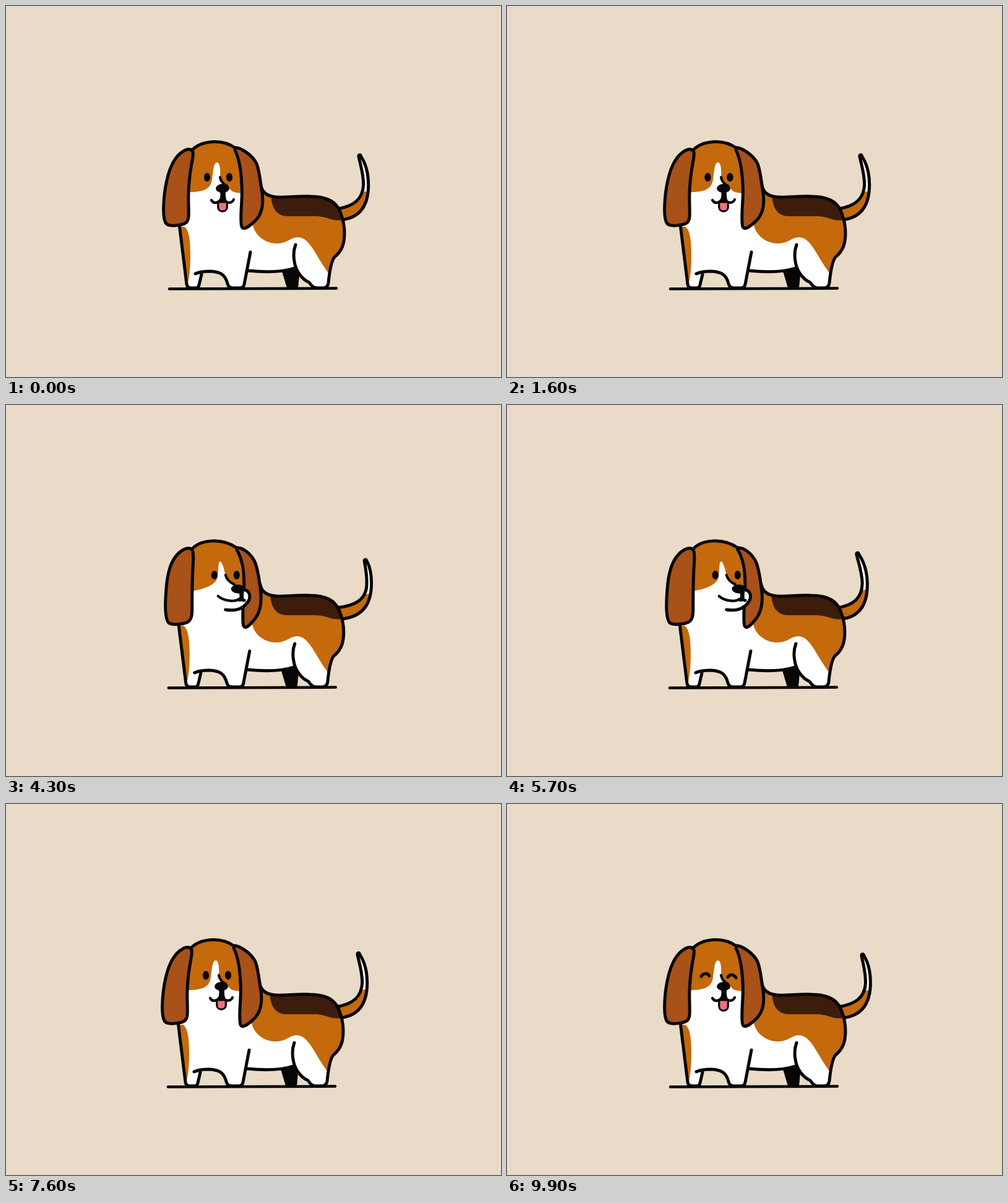
These frames come from a looping animation (800x600 px, 10000 ms). An HTML page:

```html
<!DOCTYPE html>
<html lang="en">
<head>
<meta charset="utf-8">
<title>Dog</title>
<style>
  html, body { margin: 0; width: 100%; height: 100%; overflow: hidden; background: #eadbc8; }
  svg { display: block; width: 800px; height: 600px; }
  .line { fill: none; }
  .line, .ear, .edge { stroke: #060606; stroke-width: 5; stroke-linecap: round; stroke-linejoin: round; }
  .ear { fill: #a85119; }
  .brown { fill: #c4690c; }
  .white { fill: #fff; }
  .black { fill: #060606; }
  .saddle { fill: #3d1c0c; }
  .thin { stroke-width: 4.2; }
  #tongue { fill: #f0717e; stroke-width: 3.2; }
</style>
</head>
<body>
<svg viewBox="0 0 800 600">
  <defs>
    <path id="torso" d="M296 295L281 353L292 450Q293 456 299 456L307 456Q311 456 312 451L316 432C335 428 350 430 356 443Q359 456 366 456L378 456Q384 456 385 450L391 428C420 431 445 431 468 424C475 438 484 442 490 446Q495 455 501 456L512 456Q520 455 521 448C523 428 526 412 531 406C543 396 547 385 547 365C547 345 540 325 532 317C520 306 500 307 480 308C455 310 430 311 417 302L400 250Z"/>
    <clipPath id="inTorso"><use href="#torso"/></clipPath>
    <clipPath id="inTail"><path id="tailClip"/></clipPath>
  </defs>
  <g id="dog">
    <path id="tail" class="brown"/>
    <g clip-path="url(#inTail)"><path id="tailTip" class="white"/></g>
    <path id="tailLine" class="line"/>

    <path class="black" d="M446 429L475 425L472 456L454 456Z"/>
    <use href="#torso" class="white"/>
    <g clip-path="url(#inTorso)">
      <path class="brown" d="M399 355C404 374 422 385 440 384C456 383 460 374 472 374C491 374 501 405 521 432L560 432L560 290L399 290Z"/>
      <path class="saddle" d="M428 300C428 328 438 340 456 340L500 340C522 340 523 349 548 346L548 290L428 290Z"/>
      <path class="brown" d="M278 357L288 357C296 362 298 380 298 405C298 425 296 440 294 447Z"/>
    </g>
    <g class="line">
      <path d="M412 290C414 303 424 308 437 309C455 310 470 307 493 308C520 308 535 318 541 335C545 346 547 355 547 367C547 385 543 396 531 406C526 412 523 428 521 448Q520 456 512 456L501 456Q495 455 490 447C478 442 468 428 466 413C464 402 465 394 468 386"/>
      <path d="M466 424C445 431 420 431 391 428"/>
      <path d="M395 398L385 450Q384 456 378 456L366 456Q360 456 358 449C354 433 345 430 330 429Q315 429 306 433"/>
      <path d="M280 353L292 450Q293 456 299 456L307 456Q311 456 312 451L316 434"/>
      <path d="M264 457.6L534 456.6" stroke-width="4.5"/>
    </g>

    <path id="headBase" class="white"/>
    <path id="mask" class="brown"/>
    <path id="crown" class="line"/>
    <path id="earL" class="ear"/>
    <path id="earR" class="ear"/>
    <g id="eyesOpen">
      <ellipse cx="325" cy="277" rx="5.1" ry="7"/>
      <ellipse cx="361" cy="277" rx="5.1" ry="7"/>
    </g>
    <path id="eyesHappy" class="line" d="M314 279C317 273 324 273 327 278M357 280C360 275 367 275 370 281"/>
    <path id="muzzle" class="white edge"/>
    <path id="tongue" class="edge"/>
    <path id="bridge" class="line thin"/>
    <path id="stalk" class="black"/>
    <path id="mouth" class="line thin"/>
    <ellipse id="nose" class="black" rx="11" ry="7.2"/>
  </g>
</svg>
<script>
const LOOP = 10000, STEP = 100, TAU = Math.PI * 2;
const el = id => document.getElementById(id);
const put = (id, name, value) => el(id).setAttribute(name, value);
const lerp = (a, b, k) => a + (b - a) * k;

// Each pair holds the forward and the turned shape.
const shapes = {
  headBase: ["M298 236C315 214 352 213 372 230L384 310L294 310Z",
             "M300 236C315 214 352 213 376 231L388 310L300 310Z"],
  mask: ["M298 236C315 214 352 213 372 230L382 303C375 302 366 302 363 297L356 290C350 287 347 282 346 276C347 262 345 253 341 253C335 253 335 268 333 280C331 297 318 301 296 301Z",
         "M300 236C315 214 352 213 376 231L387 298C383 297 381 296 378 294L369 289C362 286 357 281 356 275C353 262 350 253 347 253C344 253 345 268 343 279C340 290 325 297 302 301Z"],
  crown: ["M299 235C314 217 349 214 371 230", "M300 235C315 216 351 215 374 231"],
  earL: ["M302 236C299 229 291 231 282 238C266 251 259 280 256 305C254 325 253 345 259 352C265 358 285 354 290 351C297 347 295 335 295 320C294 290 298 265 301 250C303 240 302 236 302 236Z",
         "M303 236C300 229 291 231 282 238C268 250 262 270 260 300C258 325 258 345 264 352C270 357 289 354 295 351C303 346 302 335 302 320C302 290 303 265 304 250C304 240 303 236 303 236Z"],
  earR: ["M371 229C381 230 398 241 405 255C410 268 411 285 414 303C417 325 412 340 400 350C392 357 384 363 381 357C377 345 383 310 381 290C380 265 376 245 370 233Z",
         "M375 231C384 230 398 241 404 255C409 268 411 285 413 303C415 325 410 340 400 350C394 357 388 363 385 357C382 345 386 310 386 290C386 265 381 245 374 234Z"],
  bridge: ["M346 277C347 283 351 288 357 291", "M356 275C358 282 363 287 370 290"],
  stalk: ["M346 300L355 300Q354 310 358 318L342 318Q348 310 346 300Z",
          "M376 302L386 302Q384 311 387 317L377 318Q381 311 377 302Z"],
  mouth: ["M332 314C335 320 345 320 349 309M351 309C354 320 365 320 368 313",
          "M344 309C353 317 375 321 382 310M382 310C383 315 385 317 387 316"],
  muzzle: ["M360 299C366 302 366 312 362 318C358 326 352 328 345 328",
           "M385 299C396 299 398 312 391 320C382 332 368 333 356 331"]
};

function morph([from, to], k) {
  const ends = to.match(/-?[\d.]+/g);
  let i = 0;
  return from.replace(/-?[\d.]+/g, n => lerp(+n, +ends[i++], k).toFixed(2));
}

// Piecewise value through [time, value] stops.
function track(t, stops, ease = k => k) {
  let i = 1;
  while (i < stops.length - 1 && t > stops[i][0]) i++;
  const [t0, a] = stops[i - 1], [t1, b] = stops[i];
  return lerp(a, b, ease(Math.min(1, Math.max(0, (t - t0) / (t1 - t0)))));
}
const smooth = k => k * k * (3 - 2 * k);

function drawTail(w) {
  const drop = 0.6 * w + 0.028 * w * w;
  const at = (x, y, k) => `${x + w * k} ${y + drop * k}`;
  const d = `M535 328C${at(563, 324, 0.1)} ${at(577, 312, 0.45)} ${at(578, 289, 0.6)}` +
    `C${at(578, 272, 0.75)} ${at(574, 260, 0.9)} ${at(570.5, 244, 1)}` +
    `C${at(570, 241, 1)} ${at(573, 240, 1)} ${at(574, 243, 1)}` +
    `C${at(581, 254, 0.9)} ${at(586, 270, 0.65)} ${at(586, 289, 0.57)}` +
    `C${at(586, 325, 0.4)} ${at(570, 343, 0.1)} 542 346`;
  for (const id of ["tail", "tailClip", "tailLine"]) put(id, "d", d);
  put("tailTip", "d", `M${at(560, 230, 1)}L${at(600, 230, 1)}L${at(600, 303, 0.6)}` +
    `Q${at(579, 297, 0.6)} ${at(562, 304, 0.6)}Z`);
}

function draw(t) {
  const turn = track(t, [[3350, 0], [4000, 1], [5650, 1], [6300, 0]], smooth);
  const drift = track(t, [[3350, 0], [4000, -1.3], [6600, -1], [7600, -2], [9900, 0]]);
  const wag = track(t, [[0, -0.05], [7600, 7.55], [9900, 10.01]]);
  const pant = 2 * (1 - Math.cos(TAU * (t - 50) / 500));
  const glance = track(t, [[0, 0], [2700, -1], [3400, 0]]);
  const happy = t >= 8600;

  put("dog", "transform", `translate(${drift} 0)`);
  drawTail(2 + 8 * Math.sin(TAU * wag));
  for (const id in shapes) put(id, "d", morph(shapes[id], turn));

  put("eyesOpen", "transform", `translate(${glance + 13 * turn} ${-2 * turn})`);
  put("eyesOpen", "visibility", happy ? "hidden" : "visible");
  put("eyesHappy", "visibility", happy ? "visible" : "hidden");
  put("nose", "cx", lerp(350, 376, turn));
  put("nose", "cy", lerp(295, 297.5, turn));
  put("muzzle", "visibility", turn > 0.45 ? "visible" : "hidden");

  const x = lerp(350, 376, turn), y = 325 + pant * 0.7, low = 334 + pant;
  put("tongue", "d", `M${x - 7.3} 317L${x + 7.3} 317L${x + 7.3} ${y}` +
    `C${x + 7} ${low} ${x - 7} ${low} ${x - 7.3} ${y}Z`);
  put("tongue", "visibility", turn < 0.45 ? "visible" : "hidden");
}

const start = performance.now();
function tick() {
  const t = (performance.now() - start) % LOOP;
  draw(Math.floor(t / STEP) * STEP);
  requestAnimationFrame(tick);
}
tick();
</script>
</body>
</html>
```
